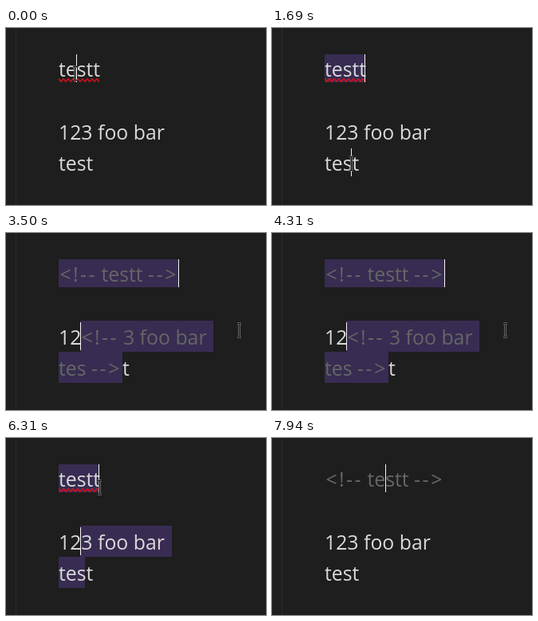
Write an HTML page with a canvas that moves like this. It is 326 px wide and 222 px high and loops after 8 s.

```html
<!DOCTYPE html>
<html lang="en">
<head>
<meta charset="utf-8">
<title>Toggle comment</title>
<style>
html, body { margin: 0; width: 100%; height: 100%; overflow: hidden; background: #1e1e1e; }
canvas { display: block; }
</style>
</head>
<body>
<canvas id="stage" width="326" height="222"></canvas>
<script>
const ctx = document.getElementById('stage').getContext('2d');
const LOOP = 8000, STEP = 62.5;
const LEFT = 66, BASE = [61, 140, 179];
const TEXT = '#dadada', MUTED = '#666666', SELECT = '#382c52';

// Pointer path: time, x, y
const PATH = [
  [0, 86, 57], [190, 87, 57], [480, 140, 95], [690, 160, 155], [810, 128, 157],
  [940, 101, 145], [1060, 101, 145], [1380, 122, 160], [1620, 100, 170],
  [1690, 99, 170], [2000, 96, 140], [2190, 96, 140], [2440, 286, 125],
  [2560, 292, 122], [5750, 292, 122], [6440, 100, 56], [LOOP, 100, 56]
];
// Spans in which the carets are lit
const LIT = [[0, 810], [1380, 2560], [2810, 3120], [3430, 3800], [4250, 5430], [5800, 7140], [7430, LOOP]];

const within = (t, a, b) => t >= a && t < b;

function pointerAt(t) {
  const i = PATH.findIndex(p => p[0] > t);
  const [t0, x0, y0] = PATH[i - 1], [t1, x1, y1] = PATH[i];
  const u = (t - t0) / (t1 - t0), e = u * u * (3 - 2 * u);
  return [x0 + (x1 - x0) * e, y0 + (y1 - y0) * e];
}

function rect(x, y, right, bottom, color) {
  ctx.fillStyle = color;
  ctx.fillRect(x, y, right - x, bottom - y);
}

function text(str, x, row, color = TEXT, spacing = 0) {
  ctx.letterSpacing = spacing + 'px';
  ctx.fillStyle = color;
  ctx.fillText(str, x, BASE[row]);
}

const openMark = (x, row) => text('<!--', x + 1.5, row, MUTED, 2.4);
const closeMark = (x, row) => text('-->', x + 1, row, MUTED, 2.6);

function caret(x, row) {
  rect(x, BASE[row] - 28, x + 1, BASE[row] + 7, '#f4f4f4');
}

function squiggle() {
  ctx.beginPath();
  for (let x = LEFT; x <= 117; x += 0.5) ctx.lineTo(x, 65.5 - 1.6 * Math.cos((x - LEFT) * Math.PI / 3));
  ctx.strokeStyle = '#d8101c';
  ctx.lineWidth = 1.5;
  ctx.stroke();
}

function beam([x, y]) {
  x = Math.round(x) + 0.5;
  y = Math.round(y);
  ctx.beginPath();
  for (const s of [-1, 1]) {
    ctx.moveTo(x - 2.5, y + 8.5 * s);
    ctx.lineTo(x + 2.5, y + 8.5 * s);
  }
  ctx.moveTo(x, y - 8);
  ctx.lineTo(x, y + 8);
  for (const [color, width] of [['#777777', 2.6], ['#1a1a1a', 1]]) {
    ctx.strokeStyle = color;
    ctx.lineWidth = width;
    ctx.stroke();
  }
}

function draw(t) {
  const pointer = pointerAt(t);
  const multi = within(t, 1680, 6560);
  const ranged = multi && (t > 2000 || pointer[1] < 149);
  const blockComment = within(t, 3000, 4630);
  const lineComment = t >= 7430;
  const commented = blockComment || lineComment;

  rect(0, 0, 326, 222, '#1e1e1e');
  rect(12, 0, 13, 222, '#2b2931');

  if (within(t, 250, 1680)) {
    ctx.fillStyle = SELECT;
    ctx.beginPath();
    ctx.roundRect(LEFT, 31, 51, 38, 3);
    ctx.fill();
  }
  if (multi) rect(LEFT, 33, blockComment ? 216 : 116, 68, SELECT);
  if (ranged) {
    rect(93, 110, blockComment ? 260 : 208, 149, SELECT);
    rect(LEFT, 149, blockComment ? 146 : 99, 188, SELECT);
  }

  if (commented) {
    openMark(LEFT, 0);
    text('testt', 119.5, 0, MUTED);
    closeMark(177, 0);
  } else text('testt', LEFT, 0);

  if (blockComment) {
    text('12', LEFT, 1);
    openMark(93, 1);
    text('3 foo bar', 147, 1, MUTED);
    text('tes', LEFT, 2, MUTED);
    closeMark(106, 2);
    text('t', 146, 2);
  } else {
    text('123 foo bar', LEFT, 1);
    text('test', LEFT, 2);
  }

  if (t < 3000 || within(t, 5480, 7430)) squiggle();

  if (LIT.some(([a, b]) => within(t, a, b))) {
    if (t < 250) caret(88, 0);
    else if (t < 6560) caret(blockComment ? 216 : 116, 0);
    else if (!lineComment) caret(99, 0);
    else caret(t < 7810 ? 152 : 142, 0);
    if (ranged) caret(93, 1);
    else if (multi) caret(99, 2);
  }
  if (t < 6680) beam(pointer);
}

ctx.font = '24.8px "Open Sans", "Noto Sans", sans-serif';
function frame() {
  const t = performance.now() % LOOP;
  draw(Math.floor((t + 2.5) / STEP) * STEP % LOOP);
  requestAnimationFrame(frame);
}
frame();
</script>
</body>
</html>
```
